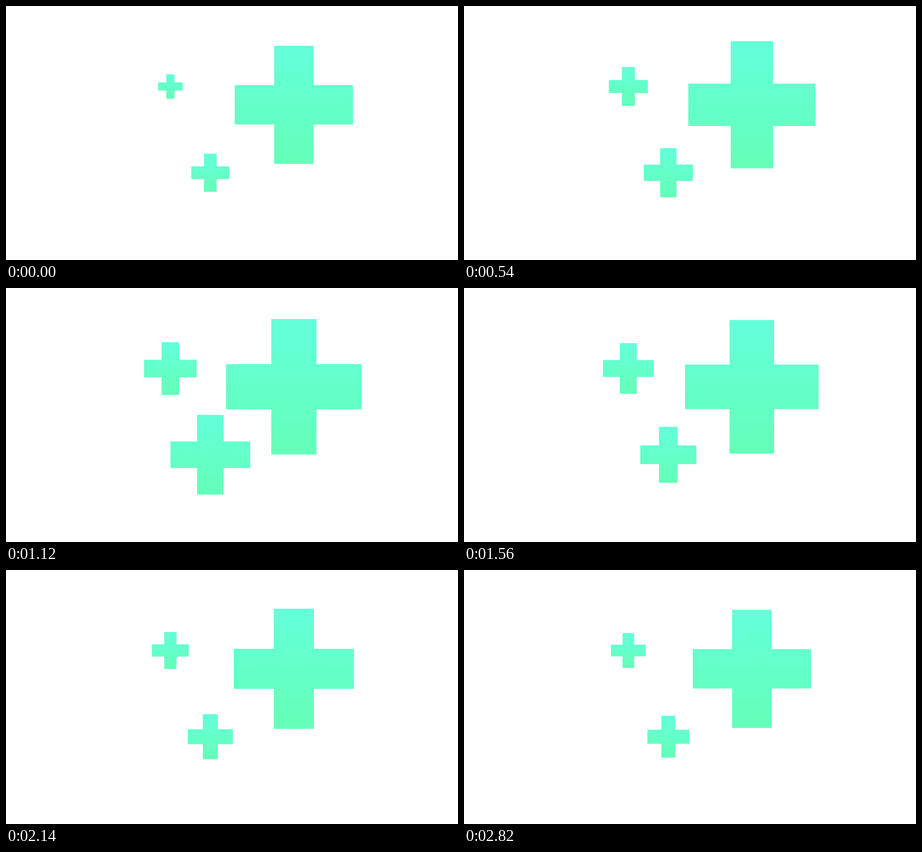
Recreate the animation shown at these times as an HTML page. Size 998 by 561 pixels, loop 2.84 s.

```html
<!DOCTYPE html>
<html lang="en">
<head>
<meta charset="utf-8">
<title>Pulsing plus signs</title>
<style>
  html, body { margin: 0; width: 100%; height: 100%; overflow: hidden; background: #fff; }
  svg { display: block; width: 100%; height: 100%; }
</style>
</head>
<body>
<svg viewBox="0 0 998 561">
  <defs>
    <linearGradient id="mint" x1="0" y1="0" x2="0" y2="1">
      <stop offset="0" stop-color="#64ffda"/>
      <stop offset="1" stop-color="#64ffb8"/>
    </linearGradient>
    <path id="plus" fill="url(#mint)" d="M-1-3h2v2h2v2h-2v2h-2v-2h-2v-2h2z"/>
  </defs>
  <use href="#plus"/>
  <use href="#plus"/>
  <use href="#plus"/>
</svg>
<script>
const LOOP = 2840, PEAK = 1080;

// Cubic Bezier easing, solved by bisection
function bezier(x1, y1, x2, y2) {
  const at = (t, a, b) => 3 * (1 - t) ** 2 * t * a + 3 * (1 - t) * t * t * b + t ** 3;
  return x => {
    let lo = 0, hi = 1;
    for (let i = 0; i < 30; i++) {
      const mid = (lo + hi) / 2;
      if (at(mid, x1, x2) < x) lo = mid; else hi = mid;
    }
    return at(lo, y1, y2);
  };
}

const swell = bezier(.69, 0, .3, 1), settle = bezier(.66, 0, .1, 1);
const pluses = [
  { x: 635.6, y: 218.2, sizes: [261, 299.2, 261], grow: swell, shrink: settle },
  { x: 362.9, y: 177.8, sizes: [54, 116.2, 77], grow: swell, shrink: settle },
  { x: 451.2, y: 368.3, sizes: [84, 179, 92.6],
    grow: bezier(.62, 0, .7, .82), shrink: bezier(.1, .08, .12, 1) }
];
const nodes = document.querySelectorAll("use");

function sizeAt({ sizes: [start, peak, end], grow, shrink }, time) {
  return time < PEAK
    ? start + (peak - start) * grow(time / PEAK)
    : peak + (end - peak) * shrink((time - PEAK) / (LOOP - PEAK));
}

function draw() {
  const time = performance.now() % LOOP;
  pluses.forEach((plus, i) => nodes[i].setAttribute("transform",
    `translate(${plus.x} ${plus.y}) scale(${sizeAt(plus, time) / 6})`));
  requestAnimationFrame(draw);
}
draw();
</script>
</body>
</html>
```
